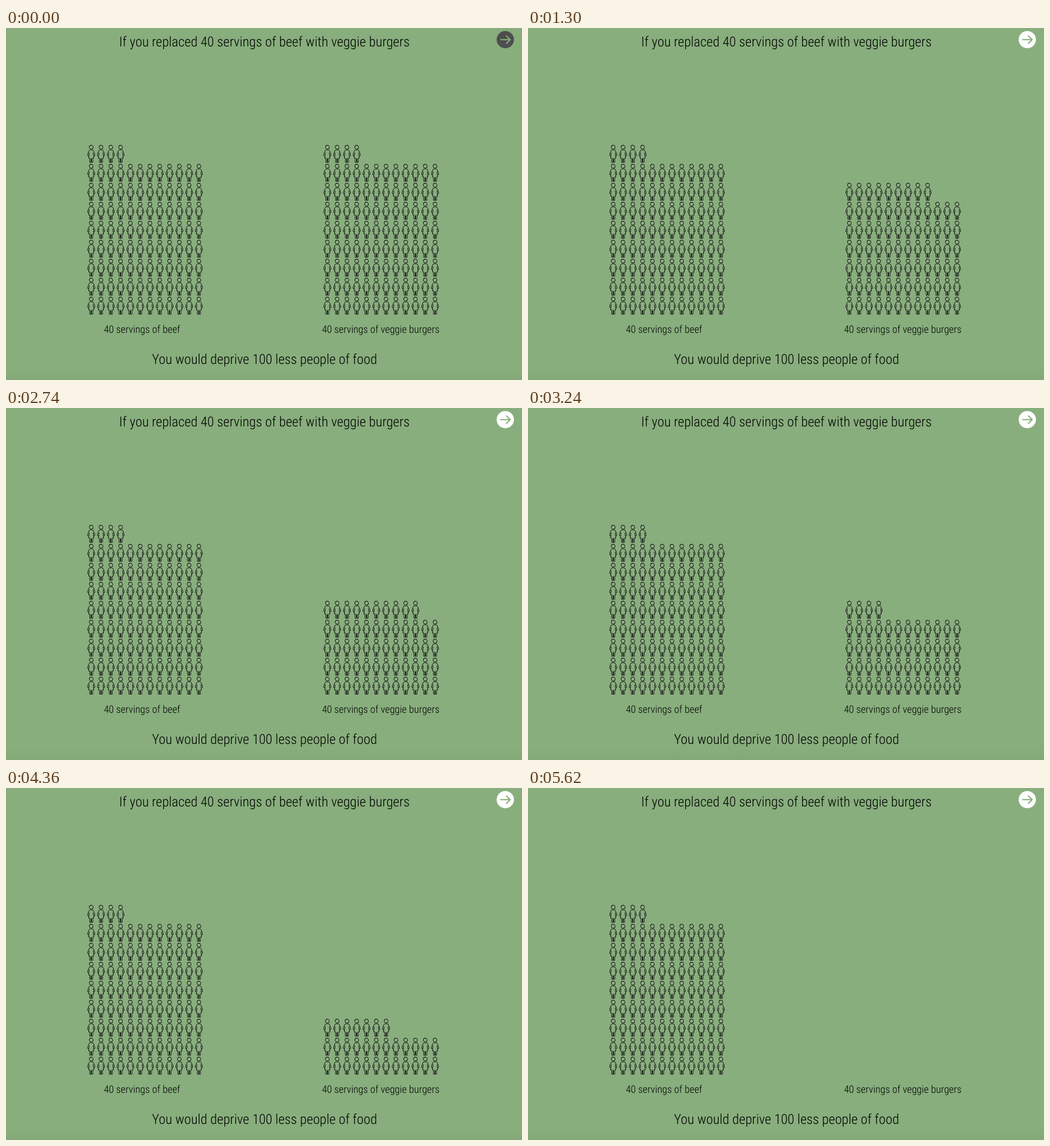
An HTML page that plays this animation: 896x612 px, repeating every 5.64 s.

```html
<!DOCTYPE html>
<html lang="en">
<head>
<meta charset="utf-8">
<style>
  html, body { margin: 0; width: 100%; height: 100%; overflow: hidden; background: #88ae7d; }
  svg { display: block; background: linear-gradient(#88ae7d 590px, #83a978); }
  text {
    font-family: "Roboto Condensed", Roboto, sans-serif;
    font-weight: 300;
    font-stretch: 75%;
    font-size: 23.9px;
    text-anchor: middle;
    text-rendering: geometricPrecision;
    fill: #000;
  }
  .label { font-size: 17.9px; }
  .outline { fill: none; stroke-linejoin: round; stroke-linecap: round; }
</style>
</head>
<body>
<svg id="stage" width="896" height="612" viewBox="0 0 896 612">
  <defs>
    <g id="shape">
      <circle cx="0" cy="4.2" r="3.3"/>
      <path d="M-2 9 C-4.6 9.6 -5 12.5 -6.2 17.5 Q-6.4 19.6 -4.7 19.4 M2 9 C4.6 9.6 5 12.5 6.2 17.5 Q6.4 19.6 4.7 19.4 M-2 9 H2"/>
      <path d="M-3.4 14 L-4.6 23 H-2.7 V30.2 Q-1.6 31.8 -.5 30.2 V24 H.5 V30.2 Q1.6 31.8 2.7 30.2 V23 H4.6 L3.4 14"/>
    </g>
    <g id="person" class="outline">
      <use href="#shape" stroke="#a3c498" stroke-width="2.2"/>
      <use href="#shape" stroke="#0a0f09" stroke-width="1.1"/>
    </g>
  </defs>
  <text x="448.7" y="32">If you replaced 40 servings of beef with veggie burgers</text>
  <text x="236.2" y="530" class="label">40 servings of beef</text>
  <text x="650.7" y="530" class="label">40 servings of veggie burgers</text>
  <text x="449" y="584">You would deprive 100 less people of food</text>
  <circle id="button" cx="867" cy="20.2" r="15"/>
  <path class="outline" d="M859 20.2 H875.5 M869 13.7 L875.5 20.2 L869 26.7" stroke="#88ae7d" stroke-width="2"/>
</svg>
<script>
  const LOOP = 5640, TOTAL = 100, COLUMNS = 12;
  // [time in ms, people left in the right-hand group]
  const countdown = [[0, 100], [800, 88], [1160, 83], [1940, 70], [2740, 58],
                     [3700, 46], [4900, 18], [5220, 8], [5560, 0], [LOOP, 0]];
  const stage = document.getElementById('stage');
  const button = document.getElementById('button');

  function makeCrowd(left) {
    return Array.from({ length: TOTAL }, (_, i) => {
      const person = document.createElementNS('http://www.w3.org/2000/svg', 'use');
      person.setAttribute('href', '#person');
      person.setAttribute('x', left + 17 * (i % COLUMNS));
      person.setAttribute('y', 467 - 33 * Math.floor(i / COLUMNS));
      return stage.appendChild(person);
    });
  }

  function peopleLeft(t) {
    const next = countdown.findIndex(([time]) => time > t);
    const [t0, n0] = countdown[next - 1], [t1, n1] = countdown[next];
    return Math.round(n0 + (n1 - n0) * (t - t0) / (t1 - t0));
  }

  makeCrowd(148);
  const crowd = makeCrowd(558);
  const start = performance.now();

  function draw() {
    const t = Math.max(0, performance.now() - start) % LOOP;
    const left = peopleLeft(t);
    crowd.forEach((person, i) => person.setAttribute('visibility', i < left ? 'visible' : 'hidden'));
    const fade = Math.min(1, Math.max(0, (t - 150) / 200));
    const grey = Math.round(78 + 177 * fade);
    button.setAttribute('fill', `rgb(${grey},${grey},${grey})`);
    requestAnimationFrame(draw);
  }
  draw();
</script>
</body>
</html>
```
